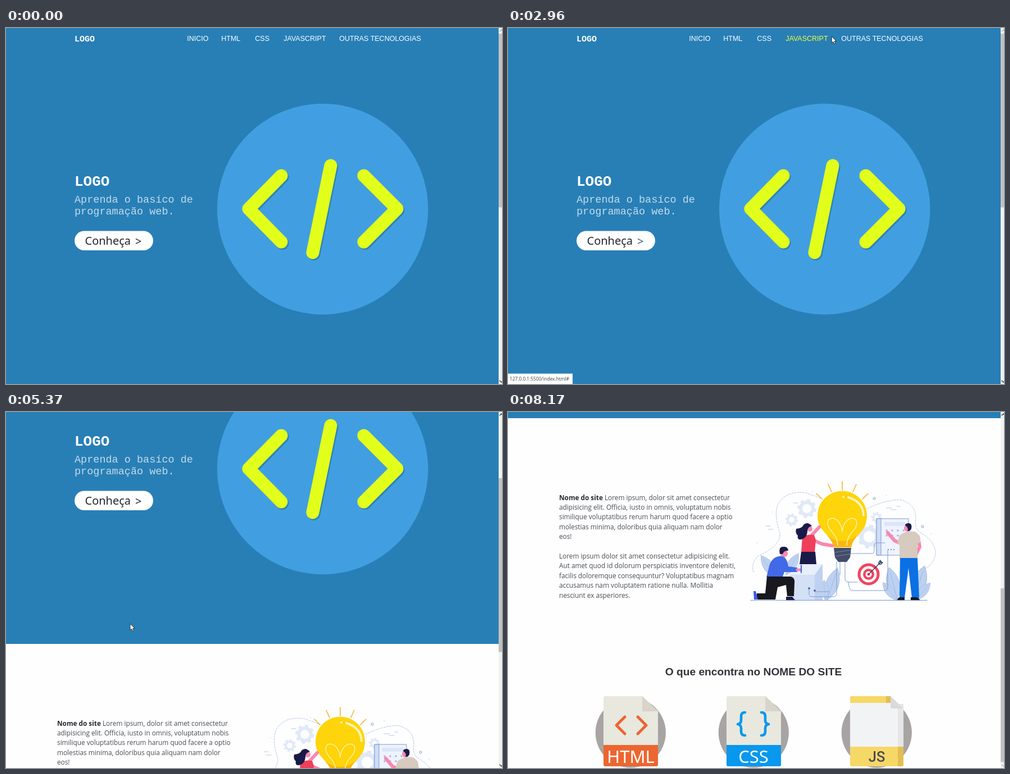
Write an HTML page that moves like this. It is 883 px wide and 634 px high and loops after 8240 ms.

```html
<!DOCTYPE html>
<html lang="pt">
<head>
<meta charset="utf-8">
<title>Programação web</title>
<style>
html, body { margin: 0; width: 100%; height: 100%; overflow: hidden; background: #fefefe; }
svg { display: block; width: 883px; height: 634px; }
.nav { font: 12.5px "Liberation Sans", Arial, sans-serif; fill: #fff; }
.mono { font-family: "Liberation Mono", "Courier New", monospace; fill: #fff; }
.body { font: 11.8px "Open Sans", "Noto Sans", sans-serif; fill: #484c53; }
.body tspan { font-weight: 700; fill: #26292e; }
.label { font: 500 31px "Noto Sans", sans-serif; fill: #fff; text-anchor: middle; }
.line { fill: none; stroke-linecap: round; stroke-linejoin: round; }
.code { stroke-width: 23; }
.skin { fill: #fb86b0; }
.limb { stroke: #fb86b0; stroke-width: 6; }
.wire { stroke: #7f9bd3; stroke-width: 1; }
.navy { fill: #191a48; }
</style>
</head>
<body>
<svg viewBox="0 0 883 634">
<defs>
  <g id="marks" class="line code">
    <path d="M490 263L432 322L490 381M578 245L546 400M637 263L696 322L637 381"/>
  </g>
</defs>
<g id="page">
  <rect width="883" height="634" fill="#287fb6"/>
  <text class="mono" x="122" y="24" font-size="15" font-weight="700">LOGO</text>
  <g id="nav" class="nav"></g>
  <circle cx="563.7" cy="322.5" r="187.7" fill="#419fe1"/>
  <use href="#marks" x="2" y="2.5" stroke="#2f82b5"/>
  <use href="#marks" stroke="#e2ff1c"/>
  <text class="mono" x="122" y="281" font-size="26" font-weight="700">LOGO</text>
  <g class="mono" font-size="18.5" opacity=".72">
    <text x="122" y="311">Aprenda o basíco de</text>
    <text x="122" y="332">programação web.</text>
  </g>
  <rect id="button" x="122" y="361.5" width="140" height="34.5" rx="17.2"/>
  <g font-family="Noto Sans, Open Sans, sans-serif" font-size="20" fill="#22262b">
    <text x="140.5" y="386">Conheça</text>
    <text id="more" x="230" y="387">&gt;</text>
  </g>

  <g transform="translate(0 623)">
    <g id="copy" class="body"></g>

    <!-- idea illustration -->
    <g class="line" stroke="#b4c4e6" stroke-dasharray="3 2">
      <path d="M437 285Q432 268 446 256Q486 238 484 215Q472 180 482 162Q496 140 530 144Q548 150 560 155"/>
      <path d="M640 172Q668 158 696 156Q725 162 726 188Q722 208 736 216Q762 232 761 253Q756 276 738 280"/>
    </g>
    <g id="gears" class="line" stroke="#e0e9f8"></g>
    <g id="leaves" fill="#bdd1f0" stroke="#9fb9e4" stroke-width=".6"></g>
    <path class="line" stroke="#b8c8e8" d="M459 203h8M463 209h9M508 162h8M673 171h10M682 174h9M692 168h6M470 178h1M443 233h1M541 142h1M673 148h1M753 217h1"/>
    <circle cx="738" cy="204" r="2" class="wire" fill="none"/>
    <circle cx="652" cy="154" r="2" class="wire" fill="none"/>
    <path d="M656 190h57v65h-57z" fill="#eef3fd" class="wire"/>
    <path d="M656 190h8v65h-8z" fill="#cfddf5" class="wire"/>
    <path d="M670 196h37v7h-37z" fill="#dbe6f8"/>
    <path class="line" stroke="#a3b9e6" stroke-width="3.6" stroke-dasharray="0 10" d="M674 211h32M674 220h32"/>
    <path class="line" stroke="#5577c0" stroke-width="2" stroke-dasharray="0 5" d="M677 245h13"/>
    <path d="M501 290L516 271H560V335H501z" fill="#d3e0f6"/>
    <path d="M501 290L516 271H560L546 290z" fill="#e7effb"/>
    <path d="M546 290L560 271V335H546z" fill="#bfd1f0"/>
    <path class="line wire" d="M536 314V323Q536 329 542 329H579Q585 329 585 323V266M546 318V320H572M591 266V290M600 266V296Q600 303 606 303H622M606 303Q607 318 613 318H670Q676 318 676 312V246M610 252H648Q652 252 652 246V238Q652 233 657 233H671"/>
    <g fill="#3859a8"><circle cx="536" cy="314" r="1.8"/><circle cx="546" cy="318" r="1.8"/></g>

    <path d="M552 194A44 44 0 1 1 638 194C635 215 615 220 611 241H580C577 220 556 215 552 194z" fill="#fed40a"/>
    <path d="M568 220Q595 240 622 220Q613 229 611 241H580Q577 229 568 220z" fill="#fbb710"/>
    <path class="line" stroke="#fff2a0" stroke-width="1.5" d="M587 237C586 215 569 212 569 197C570 184 592 186 595 213C598 186 620 184 621 197C621 212 604 215 603 237"/>
    <path class="line" stroke="#fff3b4" stroke-width="4" d="M606 152Q632 160 633 184M597 151h.1"/>
    <path d="M580 242H611L609 259L603 267H588L582 259z" fill="#434c69"/>
    <path class="line" stroke="#69738f" stroke-width="1.5" d="M582 250L609 246M583 257L608 253"/>
    <path class="line" stroke="#f5b335" stroke-width="1.6" d="M595 124V139M570 129L576 142M620 129L614 142M549 145L559 155M641 145L631 155"/>

    <!-- woman -->
    <path class="line limb" d="M541 219L554 205M543 228L559 235L577 238"/>
    <path d="M524 222Q534 217 545 219L548 228L546 250H522z" fill="#ef3f5a"/>
    <path class="navy" d="M522 249H547L549 271H519z"/>
    <circle class="skin" cx="537" cy="208" r="5"/>
    <path class="navy" d="M541 203Q533 194 526 201Q524 207 513 208Q511 216 516 220Q514 228 522 227Q533 224 533 211Q534 204 541 203z"/>

    <!-- kneeling man -->
    <circle class="skin" cx="492" cy="252" r="6"/>
    <path class="navy" d="M484 253Q481 239 491 240Q498 239 499 247Q491 246 489 253z"/>
    <path d="M466 271Q473 255 489 257Q497 260 499 275L515 277V285H492L488 296L460 294z" fill="#4169e8"/>
    <path class="line" stroke="#fb86b0" stroke-width="5" d="M515 281h6"/>
    <path class="line" stroke="#3c67dc" stroke-width="2" d="M522 273V286"/>
    <path d="M461 293H502Q511 294 510 304L509 328H497L495 308L480 312L476 334H443V323H458z" fill="#17191f"/>
    <path d="M437 319H441L445 334H438z" fill="#3c5de0"/>
    <path class="navy" d="M495 329H506L511 335H495z"/>

    <g id="target"></g>
    <path class="line" stroke="#25335f" stroke-width="1.3" d="M642 289L665 266M660 271V268L663 264V268H667L664 271z"/>

    <!-- standing man -->
    <path class="line limb" d="M703 236L688 229L676 215M730 222L733 240L725 257"/>
    <path d="M697 220Q709 210 724 213Q735 217 734 232L729 235V262H697V236L693 233z" fill="#d7cabf"/>
    <circle class="skin" cx="711" cy="207" r="6"/>
    <path class="navy" d="M707 202Q707 198 714 198Q720 199 718 208Q715 214 711 211Q714 206 707 202z"/>
    <path d="M698 260H729L732 331H719L713 278L706 331H697z" fill="#0a70e4"/>
    <path d="M693 335Q694 330 699 330H706V335zM717 335V330H727Q732 331 733 335z" fill="#14151d"/>
    <path class="line" stroke="#6f90d2" d="M432 335.3H746"/>

    <text x="437" y="469" text-anchor="middle" font-family="Liberation Sans, Arial, sans-serif" font-size="19.2" font-weight="700" fill="#2f3339">O que encontra no NOME DO SITE</text>

    <g fill="#a8a4a4"><circle cx="218.3" cy="571" r="62.6"/><circle cx="437.3" cy="571" r="62.6"/><circle cx="656.3" cy="571" r="62.6"/></g>
    <g id="files"></g>
    <path class="line" stroke="#ec6630" stroke-width="5" stroke-linecap="butt" d="M208 543L193 558L208 573M231 543L246 558L231 573"/>
    <path class="line" stroke="#0a98ec" stroke-width="4.6" d="M422 535q-7 0-7 7v7q0 6-6 7q6 1 6 7v6q0 7 7 7M451 535q7 0 7 7v7q0 6 6 7q-6 1-6 7v6q0 7-7 7"/>
    <text class="label" x="218.5" y="625">HTML</text>
    <text class="label" x="437" y="625">CSS</text>
    <path d="M612 506H681L704 528V628Q704 631 701 631H612Q609 631 609 628V509Q609 506 612 506z" fill="#f2f3f5"/>
    <path d="M694 520H704V597H694z" fill="#e7e6e6"/>
    <path d="M612 506H681V518H609V509Q609 506 612 506zM609 596H704V628Q704 631 701 631H612Q609 631 609 628z" fill="#f6d866"/>
    <path d="M673 506H681V518H673zM694 596H704V628Q704 631 701 631H694z" fill="#e2bf52"/>
    <path d="M681 506L704 528H684Q681 528 681 525z" fill="#d9dade"/>
    <text x="656.5" y="623" text-anchor="middle" font-family="Roboto, sans-serif" font-size="25.5" font-weight="500" fill="#4b4c57">JS</text>
  </g>
</g>

<g id="status">
  <path id="plate" fill="#fff"/>
  <text id="url" x="3" y="628" font-family="Open Sans, Noto Sans, sans-serif" font-size="8.3" fill="#3c4043"></text>
</g>
<path d="M877 0h6v634h-6z" fill="#f1f1f1"/>
<rect id="thumb" x="877" width="6" height="309.5" fill="#c1c1c1"/>
<path id="up" class="line" stroke-width="1.6" d="M879 6l3-3 3 3"/>
<path id="down" class="line" stroke-width="1.6" d="M879 628l3 3 3-3"/>
<g id="cursor" stroke-linejoin="round">
  <path id="arrow" d="M0 0V11.5L2.7 9.2L4.6 13.4L6.6 12.5L4.8 8.4H8.3z" fill="#fff" stroke="#222" stroke-width=".9"/>
  <path id="hand" d="M2 0Q3.5-1 4 1V6L9 7.2Q11 8 10.4 10L9 15H3L-2 9Q-2 7 0 7.6L1.6 9V1zM5.6 6.5V9M7.6 7V9.3" fill="#fff" stroke="#222" stroke-width=".9"/>
  <path id="beam" d="M-1.5-6.5H3.5M1-6.5V5M-1.5 5H3.5" fill="none" stroke="#333"/>
</g>
</svg>
<script>
const LOOP = 8240, STEP = LOOP / 120, END = 623;
const $ = id => document.getElementById(id);
const set = (id, attrs) => { for (const k in attrs) $(id).setAttribute(k, attrs[k]); };
const clamp = v => Math.max(0, Math.min(1, v));
const mix = (a, b, p) => `rgb(${a.map((v, i) => Math.round(v + (b[i] - v) * p))})`;

// label, left edge, right edge
const links = [['INICIO', 323, 359], ['HTML', 384, 419], ['CSS', 444, 470],
  ['JAVASCRIPT', 495, 568], ['OUTRAS TECNOLOGIAS', 594, 739]];
$('nav').innerHTML = links.map(([s, x]) => `<text x="${x - 0.7}" y="23">${s}</text>`).join('');

const copy = ['<tspan>Nome do site</tspan> Lorem ipsum, dolor sit amet consectetur',
  'adipisicing elit. Officia, iusto in omnis, voluptatum nobis',
  'similique voluptatibus rerum harum quod facere a optio',
  'molestias minima, doloribus quia aliquam nam dolor', 'eos!', '',
  'Lorem ipsum dolor sit amet consectetur adipisicing elit.',
  'Aut amet quod id dolorum perspiciatis inventore deleniti,',
  'facilis doloremque consequuntur? Voluptatibus magnam',
  'accusamus nam voluptatem ratione nulla. Mollitia', 'nesciunt ex asperiores.'];
$('copy').innerHTML = copy.map((s, i) => `<text x="91" y="${156.5 + i * 17.4}">${s}</text>`).join('');

$('gears').innerHTML = [[532, 172, 12], [505, 192, 8], [643, 222, 15], [656, 188, 7]].map(([x, y, r]) =>
  `<circle cx="${x}" cy="${y}" r="${r - 1}" stroke-width="${r * .5}"/>
   <circle cx="${x}" cy="${y}" r="${r * 1.25}" stroke-width="${r * .35}" pathLength="16" stroke-dasharray="1 1" stroke-linecap="butt"/>`).join('');

// base x, base y, angle, scale
$('leaves').innerHTML = [[478, 295, -35, 1.2], [484, 290, 8, 1], [495, 290, 30, 1.1], [568, 335, 18, 1.5], [565, 335, -4, .9],
  [693, 335, -14, 1.5], [692, 335, -38, 1], [722, 335, 18, 1.6], [726, 335, 40, 1]].map(([x, y, a, k]) =>
  `<path transform="translate(${x} ${y}) rotate(${a}) scale(${k})" d="M0 0Q-15-20 0-40Q15-20 0 0M0 0V-34"/>`).join('');

$('target').innerHTML = [19.5, 14.5, 10, 5.5, 2.5].map((r, i) =>
  `<circle cx="642" cy="289" r="${r}" fill="${i % 2 ? '#fff' : '#f0445f'}"/>`).join('');

$('files').innerHTML = [[170, '#ec6630'], [389, '#0898ee']].map(([x, c]) =>
  `<g transform="translate(${x})"><path d="M3 506H69L97 533V594H0V509Q0 506 3 506z" fill="#e8e8df"/>
   <path d="M69 506L97 533H69z" fill="#d8d4c9"/>
   <path d="M0 593H97V628Q97 631 94 631H3Q0 631 0 628z" fill="${c}"/></g>`).join('');

// time, x, y
const path = [[68, 756, 632], [250, 560, 520], [480, 236, 382], [650, 190, 300], [880, 126, 32],
  [1305, 268, 20], [1710, 327, 17], [2550, 478, 17], [2620, 495, 17], [2915, 567, 15], [2952, 576, 15],
  [3150, 640, 17], [3350, 650, 30], [3430, 649, 59], [3700, 430, 230], [3950, 250, 362], [4120, 221, 377],
  [6200, 221, 377], [6460, 263, 368], [6800, 430, 354], [7340, 743, 430], [7600, 866, 520], [7880, 858, 633]];

function pointer(t) {
  const i = path.findIndex(p => p[0] > t);
  if (i < 1) return path[i ? path.length - 1 : 0].slice(1);
  const [a, b] = [path[i - 1], path[i]], p = (t - a[0]) / (b[0] - a[0]);
  return [a[1] + (b[1] - a[1]) * p, a[2] + (b[2] - a[2]) * p];
}
const scroll = t => END * (1 - Math.cos(Math.PI * clamp((t - 4956) / 985))) / 2;

function inside(t, x0, y0, x1, y1) {
  const [x, y] = pointer(t), d = y + scroll(t);
  return t >= 68 && x >= x0 && x <= x1 && d >= y0 && d <= y1;
}
const onLink = (t, l) => inside(t, l[1], 10, l[2], 27);
const onButton = t => inside(t, 122, 361, 262, 396);

// colour transition: share of the last 250 ms spent hovering
function fade(test, t) {
  let n = 0;
  for (let k = 0; k < 6; k++) n += test(t - k * 45);
  return n / 6;
}

const url = '127.0.0.1:5500/index.html#', long = url + 'conteiner-apresentação';
// appears, gone, address, plate width
const hints = [[450, 870, long, 211], [1780, 3640, url, 115], [4082, 5200, long, 211]];

function draw(t) {
  const s = scroll(t), [x, y] = pointer(t);
  set('page', { transform: `translate(0 ${-Math.round(s)})` });
  links.forEach((l, i) => {
    $('nav').children[i].style.fill = mix([255, 255, 255], [240, 255, 20], fade(u => onLink(u, l), t));
  });
  set('button', { fill: mix([255, 255, 255], [255, 255, 242], fade(onButton, t)) });
  set('more', { fill: t > 480 && t < 4956 ? '#2a5f85' : '#22262b' });

  const h = hints.find(h => t >= h[0] && t < h[1]);
  set('status', { opacity: h ? clamp(Math.min((t - h[0]) / 120, (h[1] - t) / 150)) : 0 });
  if (h) {
    set('plate', { d: `M0 615.5h${h[3]}v19H0z` });
    $('url').textContent = h[2];
  }

  set('thumb', { y: 10 + s * .488 });
  set('up', { stroke: s > 0 ? '#505050' : '#b8b8b8' });
  set('down', { stroke: s < END ? '#505050' : '#b8b8b8' });

  const hand = onButton(t) || links.some(l => onLink(t, l));
  const beam = inside(t, 91, 768, 407, 955) || inside(t, 122, 296, 334, 337) || inside(t, 122, 264, 184, 284);
  const kind = hand ? 'hand' : beam ? 'beam' : 'arrow';
  for (const k of ['arrow', 'hand', 'beam']) set(k, { display: k === kind ? 'inline' : 'none' });
  set('cursor', { transform: `translate(${x} ${y})`, display: t < 68 || t >= 8100 ? 'none' : 'inline' });
}

// the picture advances in steps, like a screen recording
const start = performance.now();
function tick() {
  const t = (performance.now() - start) % LOOP;
  draw(Math.floor(t / STEP) * STEP);
  requestAnimationFrame(tick);
}
tick();
</script>
</body>
</html>
```
